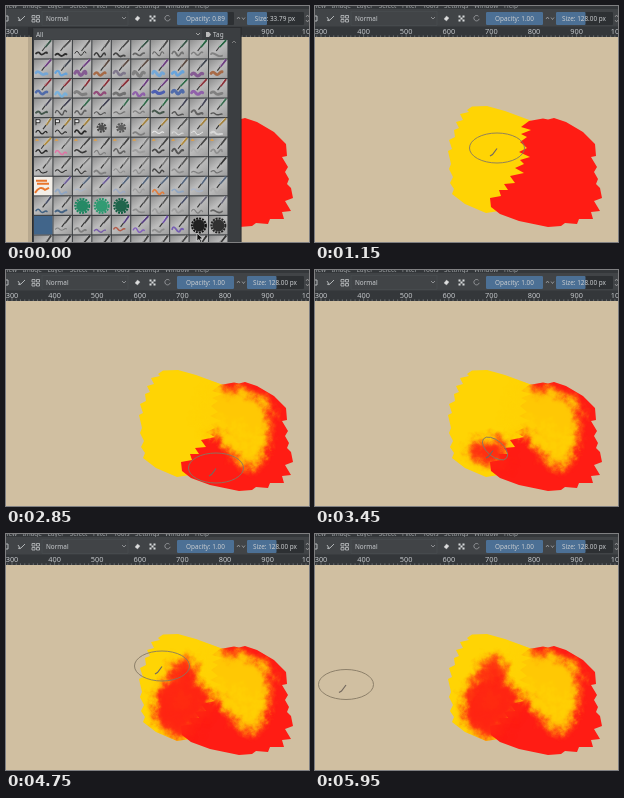
Recreate the animation shown at these times as an HTML page. Size 303 px wide and 236 px high, loop 6 s.

```html
<!DOCTYPE html>
<html lang="en">
<head>
<meta charset="utf-8">
<style>
html, body { margin: 0; width: 100%; height: 100%; overflow: hidden; background: #d0bfa1; }
svg { display: block; width: 100vw; height: 100vh; }
text { font-family: "Noto Sans", "Open Sans", sans-serif; font-size: 6.4px; fill: #c9cccf; }
.ruler text { font-size: 7.4px; text-anchor: middle; fill: #c2c5c8; }
.smear path { fill: none; stroke-linecap: round; stroke-linejoin: round; stroke-dasharray: 1 2; }
</style>
</head>
<body>
<svg id="stage" viewBox="0 0 303 236">
  <defs>
    <path id="yellow" d="M152 104L157 100.500L172 100L190 105L217 115L222 160L184 205L171 207L150 198L137 188L139 183L135 177L138 171L134 163L136 158L133 145L137 143L134 134L140 131L139 124L144 122L141 116L148 114L145 108L154 106Z"/>
    <path id="red" d="M214 115L228 112.500L233 113.500L239 112L251 116L268 126L280 138L281 150L276 151L282 161L279 166L283 173L281 178L285 182L287 192L279 195L285 205L276 206L278 213L264 213L262 218L250 217L246 220L233 221L204 215L185 208L176 201L175 192L186 190L184 184L193 184L189 178L200 177L195 170L209 167L200 162L209 158L205 154L215 151L204 146L212 142L205 136L212 131L206 128L216 124L206 121Z"/>
    <clipPath id="paint"><use href="#yellow"/><use href="#red"/></clipPath>
    <linearGradient id="tile" x1="0" y1="0" x2=".8" y2="1">
      <stop stop-color="#8e8e8e"/><stop offset=".5" stop-color="#bdbdbd"/><stop offset="1" stop-color="#a2a2a2"/>
    </linearGradient>
    <filter id="rough" filterUnits="userSpaceOnUse" x="110" y="90" width="193" height="146" color-interpolation-filters="sRGB">
      <feTurbulence type="fractalNoise" baseFrequency=".09" numOctaves="3" seed="4" result="noise"/>
      <feGaussianBlur in="SourceGraphic" stdDeviation="4.200"/>
      <feDisplacementMap in2="noise" scale="17" xChannelSelector="R" yChannelSelector="G"/>
    </filter>
    <filter id="mottle" filterUnits="userSpaceOnUse" x="110" y="90" width="193" height="146" color-interpolation-filters="sRGB">
      <feTurbulence type="fractalNoise" baseFrequency=".12" numOctaves="3" seed="9" result="noise"/>
      <feColorMatrix in="noise" values="1 0 0 0 0  0 1 0 0 0  0 0 1 0 0  0 0 0 3 -.7" result="mask"/>
      <feGaussianBlur in="SourceGraphic" stdDeviation="2.500"/>
      <feDisplacementMap in2="noise" scale="14" xChannelSelector="R" yChannelSelector="G"/>
      <feComposite operator="in" in2="mask"/>
    </filter>
  </defs>

  <rect width="303" height="236" fill="#d0bfa1"/>
  <use href="#yellow" fill="#ffd404"/>
  <use href="#red" fill="#ff1c14"/>
  <g id="smears" class="smear" clip-path="url(#paint)"></g>

  <rect width="303" height="31" fill="#34373a"/>
  <text y="1.500" x="-3" style="word-spacing:4px" opacity=".7">View Image Layer Select Filter Tools Settings Window Help</text>
  <rect y="3" width="303" height="17.500" fill="#414447"/>
  <g id="ruler" class="ruler"></g>
  <g fill="none" stroke="#bfc2c5">
    <path d="M0 10h2v5h-2M12 14q2 2 4-1l3-3M12 11l2 3" stroke-width=".9"/>
    <path d="M26 9.500h3v2.500h-3zM30.500 9.500h3v2.500h-3zM26 13.500h3v2.500h-3zM30.500 13.500h3v2.500h-3z" stroke-width=".8"/>
    <path d="M116 11l2 2 2-2M231 13l1.500-2 1.500 2M236 11.500l1.500 2 1.500-2" stroke-width=".6"/>
    <path d="M129 13l2.500-3 2.500 2-2.500 3z" fill="#ddd" stroke-width=".4"/>
    <path d="M163.500 10.300a2.700 2.700 0 1 0 .7 2.500" stroke-width=".8" opacity=".75"/>
  </g>
  <path d="M143.500 9.500h2v2h2v-2h2v2h-2v2h2v2h-2v-2h-2v2h-2v-2h2v-2h-2z" fill="#d8dadc"/>
  <text x="40" y="14.800">Normal</text>
  <rect x="36" y="5.500" width="86" height="14" fill="none" stroke="#4c5054" stroke-width=".5"/>
  <rect x="171" y="6" width="57" height="13" rx="1" fill="#2d3033"/>
  <rect id="opacityBar" x="171" y="6" height="13" rx="1" fill="#4c7095"/>
  <text id="opacity" x="199.500" y="14.800" text-anchor="middle"></text>
  <rect x="241" y="6" width="57" height="13" rx="1" fill="#2d3033"/>
  <rect id="sizeBar" x="241" y="6" height="13" rx="1" fill="#4c7095"/>
  <text id="size" x="269" y="14.800" text-anchor="middle"></text>
  <path d="M300 11l1.500-2 1.500 2M300 14l1.500 2 1.500-2" fill="none" stroke="#bbb" stroke-width=".6"/>

  <g id="picker">
    <rect x="22" y="21" width="214" height="216" fill="#000" opacity=".12"/>
    <rect x="26.500" y="21.500" width="208.500" height="216" fill="#3b3e41" stroke="#2b2d30"/>
    <rect x="28" y="23" width="168" height="10.500" fill="#424548"/>
    <text x="30" y="30.500">All</text>
    <path d="M190 27l2 2 2-2" fill="none" stroke="#ccc" stroke-width=".7"/>
    <path d="M200 26h3l2 2.500-2 2.500h-3z" fill="#bbb"/>
    <text x="207" y="30.500">Tag</text>
    <path d="M226 37l2-2 2 2" fill="none" stroke="#999" stroke-width=".7"/>
    <g id="tiles"></g>
  </g>
  <path id="arrow" d="M0 0v8l2-1.600 1.300 3 1.400-.6-1.300-3h2.600z" fill="#111" stroke="#eee" stroke-width=".6"/>
  <g id="brush">
    <ellipse id="outline" fill="none" stroke="#857964" stroke-width=".9"/>
    <path id="pen" d="M-7 8l2.500-1.500L0 .5" fill="none" stroke="#74695f" stroke-width="1.200"/>
  </g>
</svg>
<script>
const $ = id => document.getElementById(id);
const LOOP = 6000, STEP = 50;
const clamp = v => Math.max(0, Math.min(1, v));

function add(parent, tag, attrs, text) {
  const el = document.createElementNS("http://www.w3.org/2000/svg", tag);
  for (const key in attrs) el.setAttribute(key, attrs[key]);
  if (text) el.textContent = text;
  parent.append(el);
  return el;
}

function buildRuler() {
  for (let i = -1; i < 72; i++) {
    const x = 6 + i * 4.26, long = i % 10 === 0;
    add($("ruler"), "path", { d: `M${x} 31v${long ? -3 : -1.6}`, stroke: "#a5a8ab", "stroke-width": .5 });
  }
  for (let i = 0; i < 8; i++)
    add($("ruler"), "text", { x: 6 + i * 42.6, y: 27.600 }, String(300 + i * 100));
}

let seed = 17;
const random = () => (seed = (seed * 16807) % 2147483647) / 2147483647;
const jitter = (base, range) => (base + (random() - .5) * range).toFixed(1);

// Each row: mark colours, then pen handle colours.
const ROWS = [
  ["#151515 #151515 #222 #222 #333 #555 #555 #666 #777 #777", "#375447 #4a4a4a #24623f"],
  ["#6aa5dc #5aa0e0 #7c4b8c #a35d34 #756c85 #777", "#6c3d80 #5b4a42 #40454f"],
  ["#3f5fa8 #70b0e0 #777 #8c3a70 #666 #8a52a8 #3b50b0 #3f5fa8 #8a52a8 #777", "#8a2f38 #2f6a48 #6c3d80"],
  ["#31473a #444 #555 #444 #666 #777", "#2f6a48 #386b4f #445"],
  ["#111 #161616 #111 #444 #555 #777 #f0f0f0 #ddd #eee #ddd", "#333 #555 #a3833f"],
  ["#111 #e86aa2 #222 #777 #555 #999 #333 #444 #aaa #888", "#444 #b08a3a #777"],
  ["#111 #111 #222 #777 #888 #888 #333 #888 #777 #666", "#555 #777 #333"],
  ["#e8762c #89a3c4 #a8b4c8 #aaa #9aa8c4 #999", "#54657c #666 #6a5a98"],
  ["#2d5278 #31557a #16845c #24986c #0f5c40 #888 #999 #999 #777 #555", "#555 #667 #464d66"],
  ["#41658a #777 #777 #6c4ca8 #b34b35 #7a4fc0 #888 #6a4fb0 #111 #222", "#444 #6b4ba5 #553c80"],
  ["#444 #222 #222 #555 #777", "#444 #333"]
].map(row => row.map(list => list.split(" ")));
const INK_ROW = 4, PAPER_ROW = 7, BLOT_ROW = 8, TREE_ROW = 9;

function drawBlot(g, color, r) {
  add(g, "circle", { cx: 9.300, cy: 9.500, r, fill: color, opacity: .9 });
  add(g, "circle", { cx: 9.300, cy: 9.500, r: r + 1, fill: "none", stroke: color, "stroke-width": 2, "stroke-dasharray": "2 1" });
}

function buildTile(x, y, row, col) {
  const [marks, pens] = ROWS[row];
  const mark = marks[col % marks.length], pen = pens[Math.floor(random() * pens.length)];
  const g = add($("tiles"), "g", { transform: `translate(${x} ${y})` });
  add(g, "rect", { width: 18.400, height: 18.400, fill: "url(#tile)" });
  if (row === BLOT_ROW && col > 1 && col < 5 || row === TREE_ROW && col > 7) return drawBlot(g, mark, 6);
  if (row === INK_ROW && (col === 3 || col === 4)) return drawBlot(g, mark, 3);
  if (row === TREE_ROW && col === 0) return add(g, "rect", { width: 18.400, height: 18.400, fill: mark });
  if (row === PAPER_ROW && col === 0) {
    add(g, "rect", { width: 18.400, height: 18.400, fill: "#f4efe8" });
    add(g, "path", { d: "M2 4h11M3 7h12M1 16q5-8 10-3l4-2", stroke: mark, "stroke-width": 2, fill: "none" });
    return;
  }
  const d = `M2 ${jitter(14, 2)}q${jitter(2, 2)} ${jitter(-3, 3)} 4 0t4 ${jitter(1, 2)}t3 ${jitter(-1, 2)}`;
  const soft = row === 1 || row === 2;
  add(g, "path", { d, fill: "none", stroke: mark, "stroke-width": jitter(soft ? 2.800 : 1.500, 1), "stroke-linecap": "round", opacity: .85 });
  const tip = +jitter(8, 2);
  add(g, "path", { d: `M${tip} 11l3-4`, stroke: "#333", "stroke-width": 1.100 });
  add(g, "path", { d: `M${tip + 3} 7L17 0`, stroke: pen, "stroke-width": 2.200 });
  add(g, "path", { d: `M${tip + 2.500} 6.500L15.500 0`, stroke: "#ddd", "stroke-width": .7 });
  if (row === INK_ROW && col < 3) add(g, "path", { d: "M2 1v6M2 1.500h4v3h-4", stroke: "#111", fill: "#eee", "stroke-width": .8 });
  if (row === INK_ROW + 1) add(g, "path", { d: "M1 3l2-2 2 2z", fill: "#e8a03c" });
}

function buildTiles() {
  for (let row = 0; row < ROWS.length; row++)
    for (let col = 0; col < 10; col++) buildTile(28 + col * 19.450, 34 + row * 19.550, row, col);
}

const SMEARS = [
  { start: 1350, end: 1900, color: "#ffc400", width: 13, alpha: .75, filter: "mottle",
    d: "M203 163L214 151L220 168L233 155L236 176L251 163L256 180L228 177" },
  { start: 1980, end: 2620, color: "#ffd204", width: 23, alpha: .95, filter: "rough",
    d: "M203 150L209 123L225 163L235 128L233 175L251 138L252 163L243 187" },
  { start: 3250, end: 3950, color: "#ff2412", width: 17, alpha: .95, filter: "rough",
    d: "M186 190L162 181L190 176L160 168L195 163L168 156L183 148" },
  { start: 4040, end: 4730, color: "#ff2412", width: 17, alpha: .95, filter: "rough",
    d: "M176 200L156 180L161 158L178 132L185 154L197 176L166 184" },
  { start: 4780, end: 5200, color: "#ff3c10", width: 8, alpha: .6, filter: "mottle",
    d: "M172 128L182 124L188 140L160 143L154 165" }
];

for (const s of SMEARS) {
  const group = add($("smears"), "g", { filter: `url(#${s.filter})`, opacity: s.alpha });
  s.path = add(group, "path", { d: s.d, pathLength: 1, stroke: s.color, "stroke-width": s.width });
}

// Time, x, y, and outline spread: 1 hovering, 0 tilted and pressed.
const BRUSH = `700 195 205 1;900 224 180 1;1150 182 142 1;1350 183 155 1;1450 195 165 0;1530 235 180 0;
1600 200 155 0;1680 250 178 0;1750 205 162 0;1830 245 165 0;1900 195 161 0;2000 195 150 0;2080 240 150 0;
2160 200 135 0;2240 245 140 0;2320 190 125 0;2400 248 165 0;2480 215 150 0;2600 240 178 0;2700 253 188 .8;
2850 210 198 1;3050 228 195 1;3250 192 188 .2;3300 190 188 0;3400 165 172 0;3500 195 185 0;3600 162 165 0;
3700 195 170 0;3800 168 154 0;3900 178 162 .6;4000 153 160 1;4120 176 188 .3;4220 155 175 0;4320 190 178 0;
4420 160 150 0;4550 178 134 .3;4640 176 145 1;4750 156 132 1;4850 178 142 1;4950 145 122 1;5080 112 140 1;
5200 135 134 1;5400 254 194 1;5600 120 150 1;5750 27 150 1;5870 36 153 1;5950 31 150.5 1`
  .split(";").map(k => k.trim().split(" ").map(Number));

function brushAt(t) {
  let i = 0;
  while (i < BRUSH.length - 2 && BRUSH[i + 1][0] <= t) i++;
  const a = BRUSH[i], b = BRUSH[i + 1];
  const u = clamp((t - a[0]) / (b[0] - a[0])), ease = u * u * (3 - 2 * u);
  return a.map((v, k) => v + (b[k] - v) * ease);
}

function drawBrush(t) {
  const [, x, y, spread] = brushAt(t);
  $("brush").setAttribute("transform", `translate(${x} ${y})`);
  $("outline").setAttribute("rx", 15 + 12.500 * spread);
  $("outline").setAttribute("ry", 8 + 7 * spread);
  $("outline").setAttribute("transform", `rotate(${40 * (1 - spread)})`);
  $("pen").setAttribute("transform", `translate(${-2 * (1 - spread)} ${1.5 * (1 - spread)})`);
}

function render(t) {
  const fade = clamp((t - 600) / 150), selected = t >= 450, hovering = t >= 700;
  $("picker").style.display = fade < 1 ? "" : "none";
  $("picker").setAttribute("opacity", 1 - fade);
  $("arrow").style.display = hovering ? "none" : "";
  $("brush").style.display = hovering ? "" : "none";
  const move = clamp(t / 450);
  $("arrow").setAttribute("transform", `translate(${191 + 4 * move} ${227 - 16 * move})`);
  $("opacity").textContent = selected ? "Opacity: 1.00" : "Opacity: 0.89";
  $("size").textContent = selected ? "Size: 128.00 px" : "Size: 33.79 px";
  $("opacityBar").setAttribute("width", selected ? 57 : 50.700);
  $("sizeBar").setAttribute("width", selected ? 29.500 : 20);
  for (const s of SMEARS) {
    const p = clamp((t - s.start) / (s.end - s.start));
    s.path.style.display = p ? "" : "none";
    s.path.setAttribute("stroke-dashoffset", 1 - p);
  }
  drawBrush(t);
}

buildRuler();
buildTiles();
const begin = performance.now();
function tick() {
  const t = (performance.now() - begin) % LOOP;
  render(Math.floor(t / STEP) * STEP);
  requestAnimationFrame(tick);
}
tick();
</script>
</body>
</html>
```
